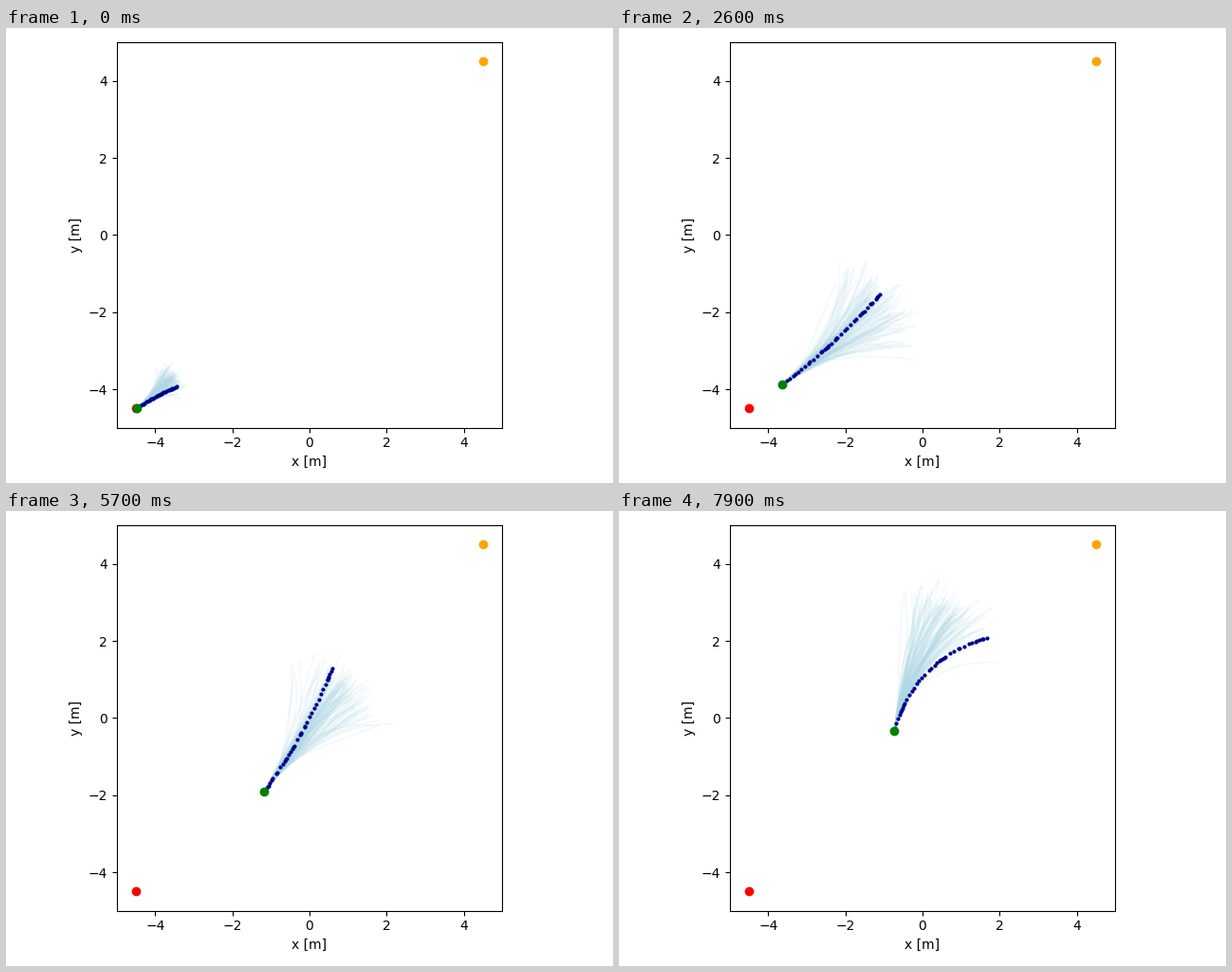
Animation, 640 px wide and 480 px high, one loop 8000 ms. Source, as a matplotlib script:

```python
import matplotlib.pyplot as plt
import numpy as np
from matplotlib.animation import FuncAnimation
from matplotlib.collections import LineCollection

FRAMES, STEP_MS = 80, 100
SAMPLES, HORIZON = 110, 40
START, GOAL = (-4.5, -4.5), (4.5, 4.5)

# waypoints the robot passes, and the frames at which it passes them
WHEN = np.array([0, 14, 26, 45, 57, 65, 79])
WAY = np.array([(-4.47, -4.49), (-4.10, -4.22), (-3.64, -3.88), (-1.94, -2.55),
                (-1.18, -1.91), (-1.00, -1.55), (-0.73, -0.34)])


def smooth_path(t, ts, pts):
    """Monotone cubic through points whose coordinates only grow."""
    h = np.diff(ts)[:, None]
    d = np.diff(pts, axis=0) / h
    inner = 2 * d[1:] * d[:-1] / (d[1:] + d[:-1])
    m = np.concatenate([d[:1], inner, d[-1:]])
    k = np.clip(np.searchsorted(ts, t, side="right") - 1, 0, len(h) - 1)
    u = (t - ts[k])[:, None] / h[k]
    return ((1 + 2 * u) * (1 - u) ** 2 * pts[k]
            + u * (1 - u) ** 2 * h[k] * m[k]
            + u * u * (3 - 2 * u) * pts[k + 1]
            + u * u * (u - 1) * h[k] * m[k + 1])


def bearing(v):
    return np.degrees(np.arctan2(v[..., 1], v[..., 0]))


frames = np.arange(FRAMES)
path = smooth_path(frames, WHEN, WAY)
heading = bearing(np.gradient(path, axis=0))
turn = 0.7 * (bearing(np.array(GOAL) - path) - heading)
reach = 1.25 + 2.25 * (1 - np.exp(-frames / 6))
sway = 35 * np.sin(2 * np.pi * (frames - 26) / 74)


def rollout(origin, angles, steps):
    """Integrate headings (degrees) and step lengths into points."""
    a = np.radians(angles)
    moves = np.stack([steps * np.cos(a), steps * np.sin(a)], axis=-1)
    return origin + np.cumsum(moves, axis=-2)


def fan_paths(rng, i):
    s = np.linspace(0, 1, HORIZON)
    bend = rng.normal(turn[i], 14, (SAMPLES, 1))
    walk = np.cumsum(rng.normal(0, 2.0, (SAMPLES, HORIZON)), axis=1)
    steps = reach[i] / HORIZON * rng.normal(1, 0.07, (SAMPLES, 1))
    return rollout(path[i], heading[i] + bend * s + walk, steps)


def plan_points(rng, i):
    steps = rng.uniform(0.1, 1.2, HORIZON)
    steps *= 1.03 * reach[i] / steps.sum()
    s = np.cumsum(steps) / steps.sum()
    bend = turn[i] + sway[i] + rng.normal(0, 8)
    steps[0] = rng.uniform(-0.1, 0.1)  # the plan may start just behind the robot
    return rollout(path[i], heading[i] + bend * s, steps)


fig, ax = plt.subplots(figsize=(6.4, 4.8), dpi=100)
ax.set(xlim=(-5, 5), ylim=(-5, 5), xlabel="x [m]", ylabel="y [m]", aspect="equal")
ax.set_xticks(range(-4, 5, 2))
ax.set_yticks(range(-4, 5, 2))
fig.tight_layout()

fan = LineCollection([], colors="lightblue", alpha=0.13, linewidths=1.5, zorder=2)
ax.add_collection(fan, autolim=False)
ax.plot(*START, "o", color="red", zorder=3)
ax.plot(*GOAL, "o", color="orange", zorder=3)
plan, = ax.plot([], [], "o", color="darkblue", markersize=2, zorder=4)
robot, = ax.plot([], [], "o", color="green", zorder=5)


def update(i):
    rng = np.random.default_rng(100 + i)
    fan.set_segments(list(fan_paths(rng, i)))
    plan.set_data(*plan_points(rng, i).T)
    robot.set_data(*path[i][:, None])
    return fan, plan, robot


anim = FuncAnimation(fig, update, frames=FRAMES, interval=STEP_MS,
                     repeat=True, repeat_delay=0)
plt.show()
```
